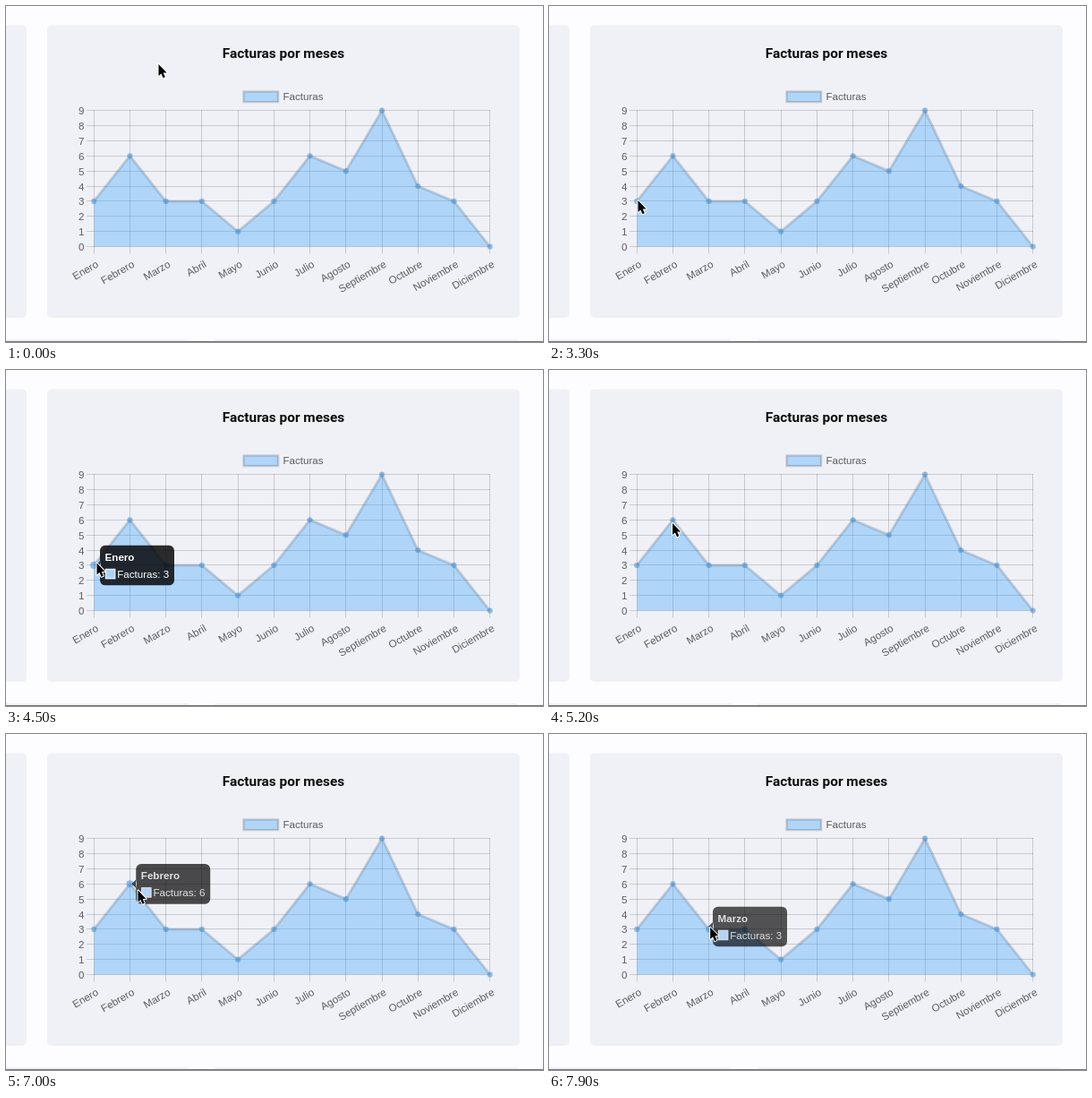
An HTML page with a canvas for the animation above (8 s loop, 600 by 375 pixels).

```html
<!DOCTYPE html>
<html lang="es">
<head>
<meta charset="utf-8">
<title>Facturas por meses</title>
<style>
  html, body { margin: 0; width: 100%; height: 100%; overflow: hidden; background: #fdfcff; }
  canvas { display: block; width: 600px; height: 375px; }
</style>
</head>
<body>
<canvas id="stage" width="600" height="375"></canvas>
<script>
const ctx = document.getElementById('stage').getContext('2d');
const LOOP = 8000;
const SANS = '"Liberation Sans", Arial, sans-serif';
const FONT = `11.6px ${SANS}`;
const BOLD = `bold 11.6px ${SANS}`;
const BLUE = 'rgba(54,162,255,0.35)';
const LINE = 'rgba(0,0,0,0.16)';

const months = ['Enero', 'Febrero', 'Marzo', 'Abril', 'Mayo', 'Junio', 'Julio',
  'Agosto', 'Septiembre', 'Octubre', 'Noviembre', 'Diciembre'];
const values = [3, 6, 3, 3, 1, 3, 6, 5, 9, 4, 3, 0];
const px = i => 98.2 + i * 40.23;
const py = v => 268.6 - v * 16.88;
const crisp = n => Math.floor(n) + 0.5;

// Pointer path: [time, x, y]
const pointer = [
  [0, 170, 64.5], [2400, 170, 64.5], [3300, 99, 216.5], [4200, 99, 216.5],
  [4500, 101, 215], [4700, 106, 208], [5100, 134, 175], [5200, 137.5, 170.5],
  [6200, 137.5, 170.5], [6500, 140, 168.5], [6800, 140, 168.5],
  [7000, 147, 174], [7700, 179, 215], [8000, 180, 215.5]
];

// Hovered points with the times they are entered and left
const hovers = [
  { i: 0, on: 3330, off: 4560 },
  { i: 1, on: 5265, off: 6970 },
  { i: 2, on: 7740, off: 9000 }
];

const clamp = n => Math.min(1, Math.max(0, n));
const mix = (a, b, p) => a + (b - a) * p;
const easeOut = p => 1 - (1 - clamp(p)) ** 4;
const smooth = p => p * p * (3 - 2 * p);

function pointerAt(t) {
  const k = pointer.findIndex(key => key[0] > t);
  const a = pointer[k - 1], b = pointer[k];
  let p = (t - a[0]) / (b[0] - a[0]);
  if (b[0] - a[0] > 600) p = smooth(p);
  return [mix(a[1], b[1], p), mix(a[2], b[2], p)];
}

function rounded(x, y, w, h, r, fill) {
  ctx.beginPath();
  ctx.roundRect(x, y, w, h, r);
  ctx.fillStyle = fill;
  ctx.fill();
}

function text(str, x, y, font, fill, align = 'left') {
  ctx.font = font;
  ctx.fillStyle = fill;
  ctx.textAlign = align;
  ctx.fillText(str, x, y);
}

function segment(x1, y1, x2, y2) {
  ctx.beginPath();
  ctx.moveTo(x1, y1);
  ctx.lineTo(x2, y2);
  ctx.stroke();
}

function drawPage() {
  ctx.fillStyle = '#fdfcff';
  ctx.fillRect(0, 0, 600, 375);
  const card = '#f0f1f6';
  rounded(-20, 21.5, 43, 326.5, 5, card);
  rounded(46, 21.5, 528, 326.5, 5, card);
  rounded(-20, 372, 226, 20, 5, card);
  rounded(231, 372, 343, 20, 5, card);
  ctx.fillStyle = '#77777b';
  ctx.fillRect(0, 374, 600, 1);
  text('Facturas por meses', 310, 58, 'bold 15.4px Roboto, sans-serif', '#0c0c0e', 'center');
}

function drawAxes() {
  const label = '#5c5c60';
  ctx.strokeStyle = LINE;
  ctx.lineWidth = 1;
  for (let v = 0; v <= 9; v++) {
    const y = crisp(py(v));
    segment(90, y, 541, y);
    text(v, 87.5, y + 4.2, FONT, label, 'right');
  }
  months.forEach((month, i) => {
    const x = crisp(px(i));
    segment(x, 116, x, 276.5);
    ctx.save();
    ctx.translate(px(i) + 5.8, 290.5);
    ctx.rotate(-Math.PI / 6);
    text(month, 0, 0, FONT, label, 'right');
    ctx.restore();
  });

  ctx.fillStyle = BLUE;
  ctx.fillRect(265.5, 95.5, 38.6, 11.6);
  ctx.lineWidth = 2.4;
  ctx.strokeRect(265.5, 95.5, 38.6, 11.6);
  text('Facturas', 309.5, 105, FONT, label);
}

function drawSeries(t) {
  ctx.beginPath();
  values.forEach((v, i) => ctx.lineTo(px(i), py(v)));
  ctx.strokeStyle = LINE;
  ctx.lineWidth = 2.9;
  ctx.lineJoin = 'miter';
  ctx.stroke();
  ctx.lineTo(px(11), py(0));
  ctx.lineTo(px(0), py(0));
  ctx.fillStyle = BLUE;
  ctx.fill();

  values.forEach((v, i) => {
    const h = hovers.find(hover => hover.i === i);
    const grow = h ? easeOut((t - h.on) / 1000) - easeOut((t - h.off) / 1000) : 0;
    ctx.beginPath();
    ctx.arc(px(i), py(v), 3.1 + grow, 0, 2 * Math.PI);
    ctx.fillStyle = 'rgba(70,145,215,0.55)';
    ctx.fill();
  });
}

function drawTooltip(t) {
  const n = hovers.findLastIndex(h => t >= h.on);
  if (n < 0) return;
  const { i, on, off } = hovers[n];
  const alpha = clamp((t - on) / 200) - clamp((t - off) / 200);
  if (alpha <= 0) return;

  // The box glides in from the previously hovered point.
  const from = hovers[Math.max(0, n - 1)].i;
  const p = easeOut((t - on) / 320);
  const x = mix(px(from), px(i), p) + 6.8;
  const y = mix(py(values[from]), py(values[i]), p) - 22.2;

  ctx.globalAlpha = alpha;
  ctx.beginPath();
  ctx.roundRect(x, y, 83, 44.6, 5.8);
  ctx.moveTo(x, y + 17.4);
  ctx.lineTo(x - 4.8, y + 22.2);
  ctx.lineTo(x, y + 27);
  ctx.lineTo(x + 1, y + 22.2);
  ctx.closePath();
  ctx.fillStyle = 'rgba(0,0,0,0.82)';
  ctx.fill('nonzero');

  text(months[i], x + 5.6, y + 17, BOLD, '#fff');
  ctx.fillStyle = '#fff';
  ctx.fillRect(x + 5.8, y + 26, 11.6, 11.6);
  ctx.fillStyle = '#abd3fb';
  ctx.fillRect(x + 6.8, y + 27, 9.6, 9.6);
  text(`Facturas: ${values[i]}`, x + 19.2, y + 36, FONT, '#fff');
  ctx.globalAlpha = 1;
}

function drawPointer(t) {
  ctx.save();
  ctx.translate(...pointerAt(t));
  const arrow = new Path2D('M.5 .5V13.6L3.4 10.9 5.5 15.8 7.8 14.8 5.7 10H9.6Z');
  ctx.lineJoin = 'round';
  ctx.strokeStyle = '#fff';
  ctx.lineWidth = 2;
  ctx.stroke(arrow);
  ctx.fillStyle = '#000';
  ctx.fill(arrow);
  ctx.restore();
}

function frame() {
  const t = performance.now() % LOOP;
  drawPage();
  drawAxes();
  drawSeries(t);
  drawTooltip(t);
  drawPointer(t);
  requestAnimationFrame(frame);
}
frame();
</script>
</body>
</html>
```
